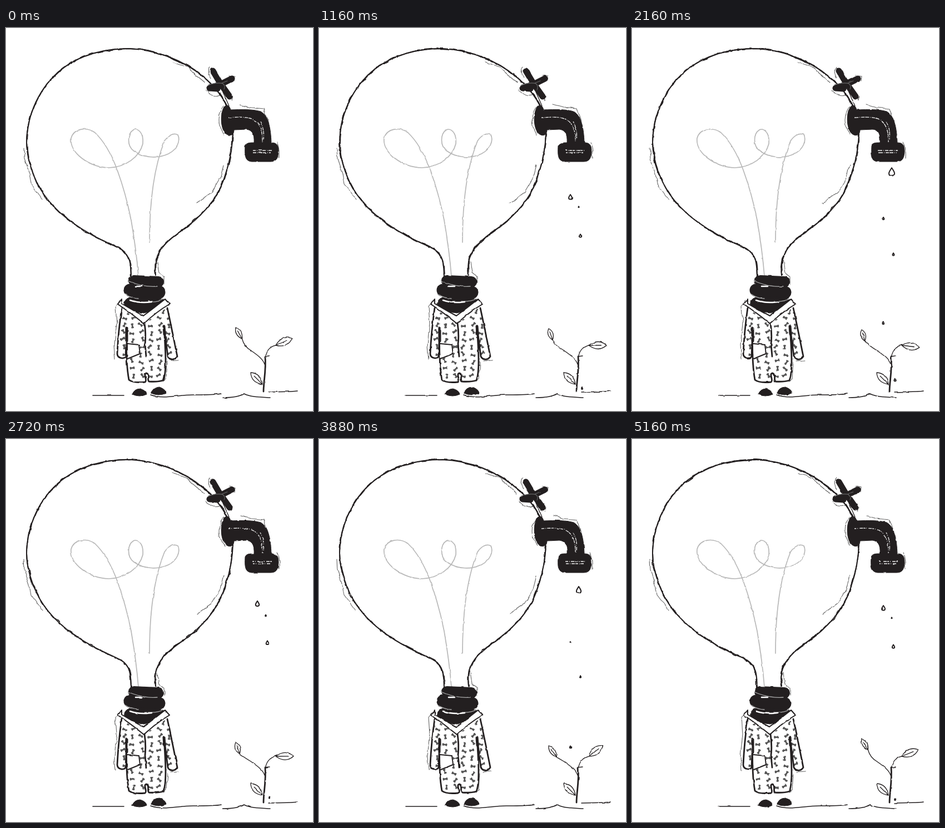
Recreate the animation shown at these times as an HTML page. Size 552x688 px, loop 5200 ms.

```html
<!DOCTYPE html>
<html lang="en">
<head>
<meta charset="utf-8">
<title>Light bulb tap</title>
<style>
  html, body { margin: 0; width: 100%; height: 100%; overflow: hidden; background: #fff; }
  svg { display: block; width: 552px; height: 688px; }
  path { fill: none; stroke: #231f20; stroke-width: 2; stroke-linecap: round; stroke-linejoin: round; }
  .ink { fill: #231f20; stroke-width: 1; }
  .thin, .thin path { stroke: #666; stroke-width: 1.1; }
  .paper { fill: #fff; }
  .fine { stroke-width: 1.3; }
  .bold { stroke-width: 2.8; }
  .petal { stroke-width: 11; }
  .streak { stroke: #eee; stroke-width: 1.3; stroke-linecap: butt; }
  .coil { stroke: #aaa; stroke-width: 1.3; }
  .gap { stroke: #fff; stroke-width: 2.5; }
  .filament { stroke: #b8b8b8; stroke-width: 1.7; }
  .print { stroke: #555; stroke-width: 2.8; }
</style>
</head>
<body>
<svg viewBox="0 0 552 688">
  <defs>
    <filter id="rough" filterUnits="userSpaceOnUse" x="0" y="0" width="552" height="688" color-interpolation-filters="sRGB">
      <feTurbulence class="noise" type="fractalNoise" baseFrequency=".08" numOctaves="2"/>
      <feDisplacementMap in="SourceGraphic" scale="2.6" xChannelSelector="R" yChannelSelector="G"/>
    </filter>
    <filter id="loose" filterUnits="userSpaceOnUse" x="0" y="0" width="552" height="688" color-interpolation-filters="sRGB">
      <feTurbulence class="noise" type="fractalNoise" baseFrequency=".06" numOctaves="2"/>
      <feDisplacementMap in="SourceGraphic" scale="6" xChannelSelector="G" yChannelSelector="R"/>
    </filter>
    <clipPath id="coatClip">
      <path d="M208 503L200 590H216L221 633H283L290 592H306L291 501L248 531Z"/>
    </clipPath>
    <path id="bulb" d="M225 446C224 430 226 410 208 398C185 386 155 375 120 350C85 325 62 296 50 265C42 245 37 225 37 205C38 155 60 106 100 74C134 48 177 37 222 37C270 39 320 58 355 88C375 104 388 121 399 143M408 190C407 215 402 240 396 258C385 300 362 325 340 345C315 367 285 380 273 408C267 420 268 432 269 444"/>
  </defs>

  <g filter="url(#loose)" class="thin">
    <use href="#bulb"/>
    <path d="M32 216L33 235L42 262L45 280L66 308M391 246L385 270L370 295L343 314M299 61L325 70L335 80L357 98"/>
    <path d="M422 138L440 143L463 145L470 165L473 178M392 140Q380 155 384 175L392 192M488 205Q493 215 492 233"/>
    <path d="M367 70Q361 76 368 90M402 85L412 87L411 95M360 112Q372 126 384 120M408 122L406 130"/>
    <path d="M205 490L197 500L199 530L195 570L197 595M290 600L288 630L283 635M296 598L311 597M272 420L275 440L284 447V460"/>
  </g>

  <g filter="url(#rough)">
    <use href="#bulb"/>
    <path class="filament" d="M238 445C236 420 231 380 225 345C218 310 211 285 200 255C190 228 178 205 160 188C145 177 122 180 117 198C114 225 150 250 185 251C215 250 240 232 246 208C248 185 235 180 229 183C218 190 217 212 230 221C250 235 275 234 292 226C308 218 314 202 309 192C300 187 290 195 285 203C272 235 258 290 258 385"/>

    <path id="drops"/>

    <!-- tap -->
    <path class="fine" d="M385 117L399 142M390 115L401 140"/>
    <path class="petal" d="M372 77L385 99L402 123M406 91L386 101L366 108L380 109"/>
    <path class="thin" d="M364 102Q382 97 390 100Q395 104 392 110M388 99L398 95"/>
    <path class="ink" d="M392 142C398 136 402 140 404 147C425 146 445 146 458 150C472 158 476 180 477 206C488 206 490 212 490 222C489 236 485 240 475 240L442 240C430 239 429 230 430 212C432 206 438 206 446 206C447 190 442 183 432 182L410 183C410 192 403 195 397 191C386 185 384 155 392 142Z"/>
    <path id="shine" class="streak" d="M400 161Q428 159 438 162Q462 168 461 205M443 220H478M444 224H476M457 168Q465 182 463 200"/>

    <!-- screw base -->
    <path style="stroke-width:20" d="M230 454L274 456"/>
    <path style="stroke-width:23" d="M223 471Q245 478 275 475"/>
    <path class="ink" d="M222 484Q211 488 213 498Q222 510 248 512Q272 508 284 488Q255 480 222 484Z"/>
    <path class="coil" d="M219 454Q245 466 272 464M214 478Q226 486 238 486M256 491Q274 492 283 486"/>
    <path class="gap" d="M233 464H244M223 489Q240 495 262 492"/>

    <!-- coat -->
    <g clip-path="url(#coatClip)"><path id="print" class="print"/></g>
    <path class="paper" d="M208 487L201 496Q225 512 248 531Q270 510 294 496L286 487Q266 503 247 517Q226 506 208 495Z"/>
    <path class="bold" d="M208 503C204 530 201 565 200 585C200 594 213 595 215 590L217 540M290 503C296 530 303 565 308 590C303 598 294 596 291 590L284 535M216 538C217 580 216 605 221 632Q228 638 250 636C255 633 246 622 252 620C259 621 253 632 257 635Q273 636 283 633C290 615 286 570 284 536M249 530Q252 550 250 568L252 590"/>
    <path style="stroke-width:5" d="M217 540V562M284 536L285 550"/>
    <path class="paper" d="M218 567L239 569L241 585L219 594"/>

    <!-- shoes and ground -->
    <path class="ink" d="M227 658Q231 648 241 648Q252 651 253 658Q240 664 227 658ZM261 656Q264 645 276 645Q287 649 288 656Q274 662 261 656Z"/>
    <path style="stroke-width:1.6" d="M156 660H212M260 659C285 668 310 658 340 659C360 659 375 659 387 657M390 664C405 664 420 662 428 657C440 663 455 663 475 664M472 654C490 653 510 654 524 652"/>

    <!-- plant -->
    <path class="bold" d="M463 653C463 635 468 615 466 590"/>
    <path id="plant" class="fine"/>
  </g>
</svg>
<script>
const LOOP = 5200, STEP = 40, BOIL = 80;
const el = id => document.getElementById(id);
const noises = document.querySelectorAll('.noise');

const poseTimes = [0, 1160, 2160, 3280, 3880, 4560, 5160, 5200];
const rightAngle = [-23, 0, 7, -8, -37, -30, -22, -23];
const leftTip = [538, 540, 542, 548, 551, 545, 538, 538];

// x, first y, speed in px/ms, first start, life, size
const drops = [
  [452, 234, .193, 0, 740, 8],
  [467, 250, .105, 480, 720, 8],
  [470, 359, .17, 280, 640, 3.5],
  [452, 514, .197, 480, 560, 2.5],
  [473, 620, .086, 840, 360, 2.5],
  [473, 630, .05, 520, 100, 2.5]
];

function pose(values, t) {
  let i = 0;
  while (i < poseTimes.length - 2 && t >= poseTimes[i + 1]) i++;
  const k = (t - poseTimes[i]) / (poseTimes[i + 1] - poseTimes[i]);
  return values[i] + (values[i + 1] - values[i]) * k;
}

function leaf(x, y, tx, ty, width) {
  const dx = tx - x, dy = ty - y, len = Math.hypot(dx, dy);
  const nx = -dy / len * width, ny = dx / len * width;
  const mx = x + dx * .55, my = y + dy * .55;
  return `M${x} ${y}Q${mx + nx} ${my + ny} ${tx} ${ty}Q${mx - nx} ${my - ny} ${x} ${y}L${x + dx * .7} ${y + dy * .7}`;
}

function plantPath(t) {
  const angle = pose(rightAngle, t), a = angle * Math.PI / 180;
  const ty = pose(leftTip, t), bx = 420 - angle * .2, by = ty + 20.5;
  return `M465 604C462 594 450 586 440 579Q428 572 ${bx} ${by}` +
    leaf(bx, by, 413, ty, 9) +
    'M466 597C466 580 475 572 485 570' +
    leaf(485, 570, 485 + 32 * Math.cos(a), 570 + 32 * Math.sin(a), 13) +
    leaf(461, 640, 440, 619, 12) + 'M466 590L474 589';
}

function dropPath(t) {
  return drops.map(([x, y0, speed, start, life, size]) => {
    if (t <= start) return '';
    const age = (t - start) % 800;
    if (age > life) return '';
    const y = y0 + speed * age, s = size * (1 - age / 760), w = s * .7;
    return `M${x} ${y - s}Q${x + w} ${y} ${x + w} ${y + s * .4}Q${x + w} ${y + s} ${x} ${y + s}` +
      `Q${x - w} ${y + s} ${x - w} ${y + s * .4}Q${x - w} ${y} ${x} ${y - s}`;
  }).join('');
}

function printPath() {
  let d = '', n = 0;
  for (let y = 508; y < 636; y += 13)
    for (let x = 205 + n % 2 * 7; x < 306; x += 16) {
      const a = ++n * 2.4, px = x + Math.sin(n * 5) * 2, py = y + Math.cos(n * 3) * 2;
      const c = Math.cos(a), s = Math.sin(a);
      d += `M${px - 3 * c} ${py - 3 * s}L${px + 3 * c} ${py + 3 * s}`;
      for (const k of [-3, 3])
        d += `M${px + k * c - s} ${py + k * s + c}l${2 * s} ${-2 * c}`;
    }
  return d;
}

function draw(now) {
  const t = Math.floor(now % LOOP / STEP) * STEP;
  const seed = Math.floor(t / BOIL) + 1;
  noises.forEach(n => n.setAttribute('seed', seed));
  el('drops').setAttribute('d', dropPath(t));
  el('plant').setAttribute('d', plantPath(t));
  el('shine').setAttribute('stroke-dasharray', `${3 + seed * 3 % 5} 2 1 ${1 + seed % 3} 6 1`);
  requestAnimationFrame(draw);
}

el('print').setAttribute('d', printPath());
requestAnimationFrame(draw);
</script>
</body>
</html>
```
